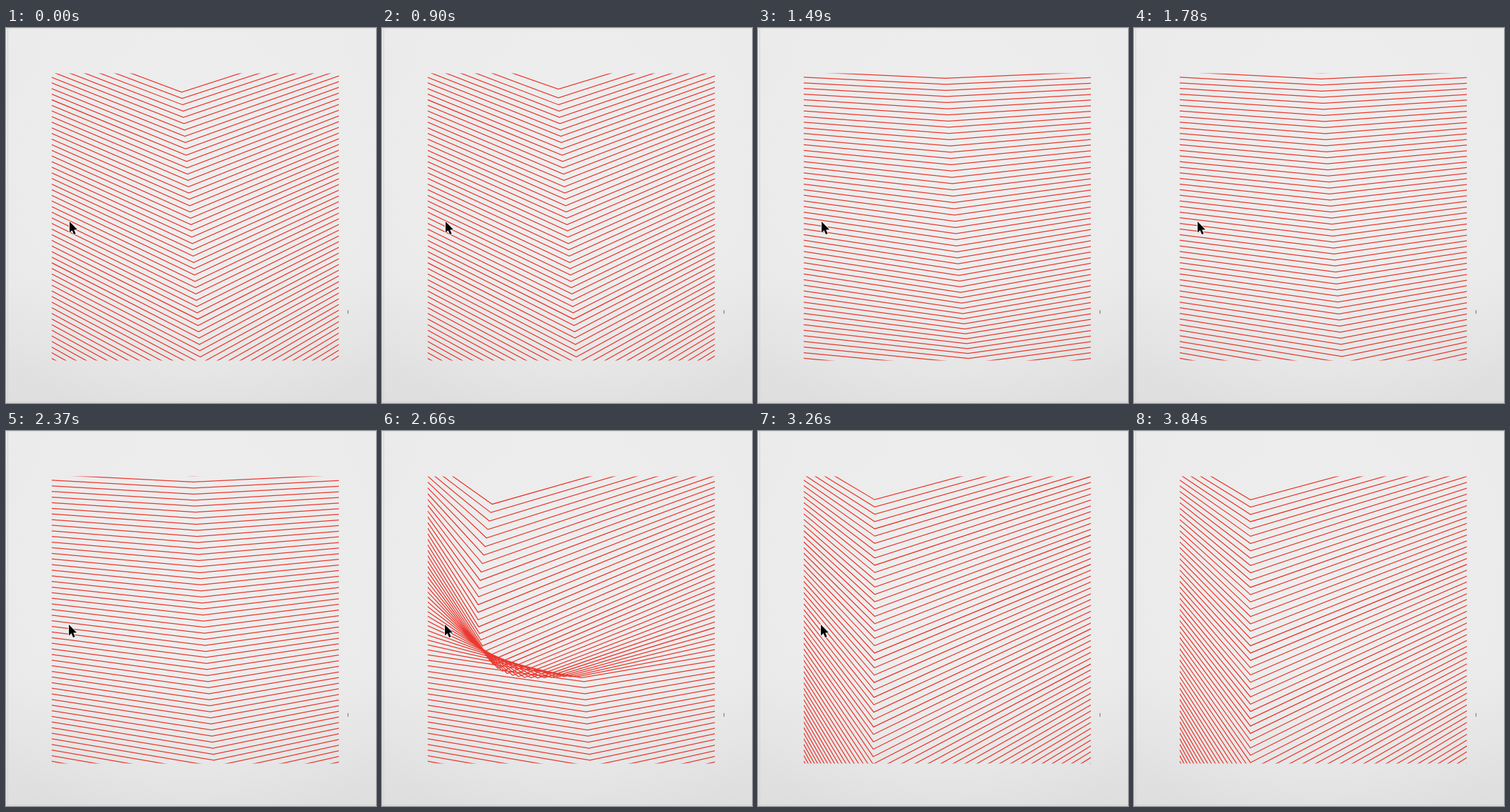
An HTML page with a canvas that plays this animation: 518x525 px, repeating every 4190 ms.

```html
<!DOCTYPE html>
<html lang="en">
<head>
<meta charset="utf-8">
<title>Folding lines</title>
<style>
  html, body { margin: 0; width: 100%; height: 100%; overflow: hidden; background: #e9e9e9; }
  canvas { display: block; }
</style>
</head>
<body>
<canvas id="stage" width="518" height="525"></canvas>
<script>
const ctx = document.getElementById('stage').getContext('2d');
const LOOP = 4190;
const LINES = 60;
const LEFT = 64, RIGHT = 466, TOP = 63.5, BOTTOM = 465.5;
const DURATION = 1000, STAGGER = 7, STEP = 147;

// The picture is only refreshed at these moments (ms).
const ticks = [900, 1050, 1200, 1340, 1490, 1630, 1780, 1930, 2070, 2220, 2370,
               2510, 2660, 2810, 2960, 3110, 3260, 3400, 3550, 3690, 3840];

// Each value is [first line, increment per line].
const poses = [
  { left: [21.75, 7.87], x: [246, 0.62], y: [89.8, 8.83], right: [19, 8] },
  { left: [21.75, 7.87], x: [258.9, 0.63], y: [29, 8.47], right: [22.1, 7.88] },
  { left: [37.3, 7.87], x: [163, 0], y: [96.3, 10.22], right: [14.5, 8.2] }
];

function elasticOut(t) {
  if (t <= 0) return 0;
  if (t >= 1) return 1;
  return 1 + 2 ** (-10 * t) * Math.sin((t - 0.1) * 2 * Math.PI / 0.4);
}

function drawBackground() {
  const shade = ctx.createLinearGradient(0, 0, 0, 525);
  shade.addColorStop(0, '#ebebeb');
  shade.addColorStop(0.65, '#e9e9e9');
  shade.addColorStop(1, '#dedede');
  ctx.fillStyle = shade;
  ctx.fillRect(0, 0, 518, 525);

  const glow = ctx.createRadialGradient(265, 250, 60, 265, 250, 330);
  glow.addColorStop(0, 'rgba(239,239,239,.9)');
  glow.addColorStop(1, 'rgba(239,239,239,0)');
  ctx.fillStyle = glow;
  ctx.fillRect(0, 0, 518, 525);

  ctx.fillStyle = '#d3d3d3';
  ctx.fillRect(2, 0, 1, 525);
  ctx.fillRect(0, 523, 518, 1);
  ctx.fillStyle = '#dedede';
  ctx.fillRect(0, 0, 518, 1);
  ctx.fillStyle = '#9a9691';
  ctx.fillRect(478, 395, 1.5, 5);
}

function drawLines(tick) {
  ctx.save();
  ctx.beginPath();
  ctx.rect(LEFT, TOP, RIGHT - LEFT, BOTTOM - TOP);
  ctx.clip();
  ctx.beginPath();
  const second = tick >= 11;
  const from = poses[second ? 1 : 0], to = poses[second ? 2 : 1];
  const age = second ? 115 + (tick - 11) * STEP : 9 + tick * STEP;
  for (let i = 0; i < LINES; i++) {
    const k = tick < 0 ? 0 : elasticOut((age - i * STAGGER) / DURATION);
    const at = key => {
      const a = from[key][0] + from[key][1] * i;
      const b = to[key][0] + to[key][1] * i;
      return a + (b - a) * k;
    };
    ctx.moveTo(LEFT, at('left'));
    ctx.lineTo(at('x'), at('y'));
    ctx.lineTo(RIGHT, at('right'));
  }
  ctx.strokeStyle = '#ea392f';
  ctx.lineWidth = 1.25;
  ctx.stroke();
  ctx.restore();
}

function drawCursor(x, y) {
  ctx.save();
  ctx.translate(x, y);
  ctx.beginPath();
  [[0, 0], [0, 15.5], [3.6, 12.3], [6, 18], [8.6, 16.9], [6.2, 11.4], [11, 11.2]]
    .forEach(([px, py]) => ctx.lineTo(px, py));
  ctx.closePath();
  ctx.lineJoin = 'round';
  ctx.strokeStyle = '#fff';
  ctx.lineWidth = 1.6;
  ctx.stroke();
  ctx.fillStyle = '#000';
  ctx.fill();
  ctx.restore();
}

function draw(now) {
  const t = now % LOOP;
  const tick = ticks.filter(time => time <= t).length - 1;
  drawBackground();
  drawLines(tick);
  if (t < 3400) drawCursor(t < 2220 ? 89 : 88, 271);
}

const start = performance.now();
function frame() {
  draw(performance.now() - start);
  requestAnimationFrame(frame);
}
frame();
</script>
</body>
</html>
```
